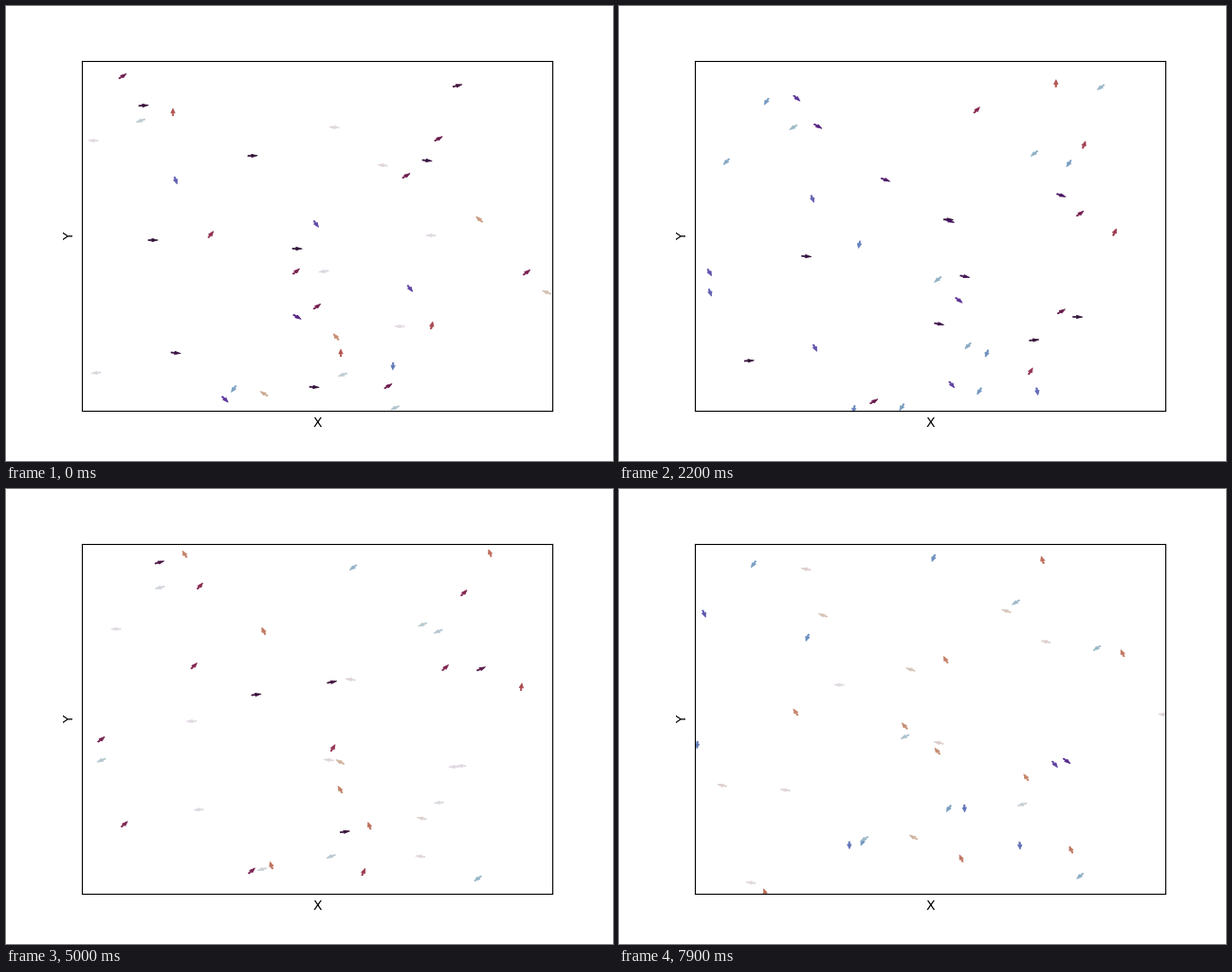
A matplotlib script that plays this animation: 640 by 480 pixels, repeating every 8 s.

```python
import numpy as np
import matplotlib.pyplot as plt
from matplotlib.animation import FuncAnimation
from matplotlib.collections import PolyCollection

FRAMES, INTERVAL = 80, 100
BOX = 496.0          # side of the periodic square world
STEP = 4.1           # distance covered per frame
NOISE = 2.05         # half-width of the heading noise, rad
LEFT, BOTTOM, HEIGHT = 80.0, 427.2, 369.6

# starting place on the stage (px) and heading (deg) of every particle
START = np.array([
    (123, 74, 42), (145, 105, 6), (176, 112, 90), (142, 121, -155),
    (92, 142, 178), (260, 158, 3), (179, 184, -75), (346, 128, 174),
    (476, 84, 18), (456, 140, 38), (444, 163, -8), (397, 168, 172),
    (422, 179, 40), (499, 225, 130), (327, 230, -62), (216, 241, 60),
    (155, 247, 0), (307, 256, -1), (306, 280, 48), (335, 280, -170),
    (448, 242, -179), (426, 298, -60), (549, 281, 46), (570, 302, 152),
    (328, 317, 45), (307, 328, -38), (348, 349, 122), (353, 366, 90),
    (355, 389, -155), (415, 338, 180), (449, 337, 80), (408, 380, -92),
    (403, 401, 40), (325, 402, -5), (410, 424, -148), (179, 366, -8),
    (95, 387, -172), (240, 404, -118), (231, 415, -52), (272, 409, 140),
], float)

# common direction the flock follows over time
TURN_AT = [0, 15, 25, 33, 45, 57, 66, 72, 79]
TURN_TO = [15, -30, -25, 85, 145, 80, 120, 185, 215]

# arrow outline pointing along +x
ARROW = np.array([(-5, 0.7), (-1.2, 0.7), (-1.2, 2.2), (5.2, 0),
                  (-1.2, -2.2), (-1.2, -0.7), (-5, -0.7)])


def simulate():
    """Noisy flocking: each heading scatters around the shared direction."""
    rng = np.random.default_rng(12)
    pos = np.column_stack([START[:, 0] - LEFT,
                           (BOTTOM - START[:, 1]) * BOX / HEIGHT])
    theta = np.radians(START[:, 2])
    states = []
    for n in range(FRAMES):
        states.append((pos, theta))
        pos = (pos + STEP * np.column_stack([np.cos(theta), np.sin(theta)])) % BOX
        mean = np.radians(np.interp(n + 1, TURN_AT, TURN_TO))
        theta = mean + rng.uniform(-NOISE, NOISE, len(theta))
    return states


def outlines(pos, theta):
    c, s = np.cos(theta)[:, None], np.sin(theta)[:, None]
    x, y = ARROW.T
    return np.stack([pos[:, :1] + c * x - s * y,
                     pos[:, 1:] + s * x + c * y], axis=-1)


STATES = simulate()

plt.rcParams["font.family"] = "DejaVu Sans"
fig, ax = plt.subplots(figsize=(6.4, 4.8), dpi=100)
ax.set(xlim=(0, BOX), ylim=(0, BOX), xticks=[], yticks=[],
       xlabel="X", ylabel="Y")
flock = PolyCollection(outlines(*STATES[0]), linewidths=0.5)
ax.add_collection(flock, autolim=False)


def draw(n):
    pos, theta = STATES[n]
    colors = plt.cm.twilight((theta + np.pi) / (2 * np.pi) % 1)
    flock.set_verts(outlines(pos, theta))
    flock.set_facecolor(colors)
    flock.set_edgecolor(colors)
    return (flock,)


anim = FuncAnimation(fig, draw, frames=FRAMES, interval=INTERVAL,
                     init_func=lambda: draw(0), repeat=True, repeat_delay=0)
plt.show()
```
